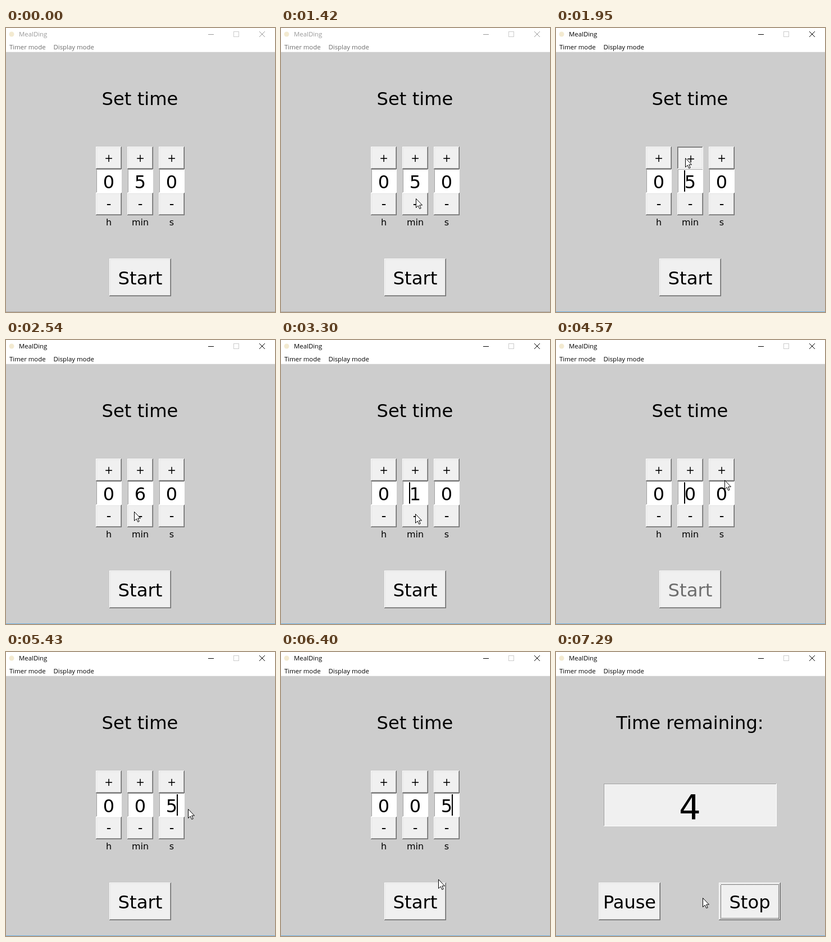
Animation, 479 px wide and 505 px high, one loop 8 s. Source, as an HTML page:

```html
<!DOCTYPE html>
<html lang="en">
<head>
<meta charset="utf-8">
<title>MealDing</title>
<style>
  html, body { margin: 0; width: 100%; height: 100%; overflow: hidden; background: #cdcdcd; }
  svg { display: block; width: 479px; height: 505px; }
  text { font-family: "DejaVu Sans", Verdana, sans-serif; white-space: pre; }
  .ui { font-family: "Open Sans", "Noto Sans", sans-serif; font-size: 11.4px; }
</style>
</head>
<body>
<svg id="stage" viewBox="0 0 479 505" xmlns="http://www.w3.org/2000/svg"></svg>
<script>
const LOOP = 8000;
const stage = document.getElementById("stage");

function add(parent, tag, attrs, content) {
  const node = document.createElementNS("http://www.w3.org/2000/svg", tag);
  for (const key in attrs) node.setAttribute(key, attrs[key]);
  if (content !== undefined) node.textContent = content;
  parent.append(node);
  return node;
}
const rect = (parent, x, y, width, height, fill) =>
  add(parent, "rect", { x, y, width, height, fill });
const label = (parent, x, y, size, content) =>
  add(parent, "text", { x, y, "font-size": size, "text-anchor": "middle" }, content);
const show = (node, visible) => node.setAttribute("display", visible ? "inline" : "none");

// One-pixel bevel: top and left in one colour, bottom and right in the other.
function bevel(parent, x, y, w, h, light, dark) {
  const lines = { fill: "none", "shape-rendering": "crispEdges" };
  add(parent, "path", { ...lines, stroke: light, d: `M${x + .5} ${y + h - 1}V${y + .5}H${x + w - 1}` });
  add(parent, "path", { ...lines, stroke: dark, d: `M${x} ${y + h - .5}H${x + w - .5}V${y}` });
}

function button(parent, x, y, w, h, content, size, baseline) {
  rect(parent, x, y, w, h, "#f0f0f0");
  const raised = add(parent, "g", {});
  bevel(raised, x, y, w, h, "#fff", "#696969");
  bevel(raised, x + 1, y + 1, w - 2, h - 2, "#e3e3e3", "#a0a0a0");
  const sunken = add(parent, "g", { display: "none" });
  bevel(sunken, x, y, w, h, "#696969", "#fff");
  bevel(sunken, x + 1, y + 1, w - 2, h - 2, "#a0a0a0", "#e3e3e3");
  const text = label(parent, x + w / 2, baseline, size, content);
  return {
    text,
    press(down) {
      show(raised, !down);
      show(sunken, down);
      text.setAttribute("transform", down ? "translate(1 1)" : "");
    }
  };
}

function field(parent, x, y, w, h, fill) {
  rect(parent, x, y, w, h, fill);
  bevel(parent, x, y, w, h, "#a0a0a0", "#fff");
}

// Window frame
rect(stage, 0, 0, 479, 505, "#cdcdcd");
rect(stage, 0, 0, 479, 42, "#fff");
rect(stage, 0, 42, 479, 1, "#f0f0f0");
const bottomEdge = rect(stage, 0, 504, 479, 1, "#aaa");
add(stage, "circle", { cx: 10, cy: 11, r: 4.5, fill: "#f3ead0" });
const caption = add(stage, "text", { x: 23, y: 15, class: "ui" }, "MealDing");
const menus = add(stage, "g", { class: "ui" });
add(menus, "text", { x: 6, y: 38, class: "ui" }, "Timer mode");
add(menus, "text", { x: 84.5, y: 38, class: "ui" }, "Display mode");
const controls = add(stage, "g", { fill: "none" });
add(controls, "path", { d: "M360 11.5H370" });
add(controls, "path", { d: "M451 6L461 16M461 6L451 16" });
add(stage, "rect", { x: 405.5, y: 6.5, width: 9, height: 9, fill: "none", stroke: "#ccc" });

// Setup screen
const setup = add(stage, "g", {});
label(setup, 238.5, 136.5, 32.2, "Set time");
const columns = ["h", "min", "s"].map((unit, i) => {
  const x = 160 + 56 * i;
  const plus = button(setup, x, 211, 46, 40, "+", 18.67, 238);
  field(setup, x + 1, 251, 45, 42, "#fff");
  const value = label(setup, x + 23, 285, 32, "0");
  const minus = button(setup, x, 293, 46, 40, "-", 24, 320.5);
  label(setup, x + 23, 351, 16, unit);
  return { plus, minus, value };
});
const [, minutes, seconds] = columns;
const start = button(setup, 184, 410, 110, 67, "Start", 32.4, 456);
const caret = rect(setup, 0, 253, 2, 38, "#000");

// Running screen
const running = add(stage, "g", {});
label(running, 238.5, 136.5, 32.2, "Time remaining:");
field(running, 85, 234, 308, 76, "#f0f0f0");
const remaining = label(running, 238.5, 296.5, 61, "5");
button(running, 76, 410, 110, 67, "Pause", 32, 456);
button(running, 290, 410, 110, 67, "Stop", 32.2, 456);
add(running, "rect", {
  x: 293.5, y: 413.5, width: 103, height: 60, fill: "none", stroke: "#000",
  "stroke-dasharray": "1 1", "shape-rendering": "crispEdges"
});

const pointer = add(stage, "path", {
  d: "M.5 .5V16.5L4.2 13L6.8 18.5L9.2 17.5L6.7 12H11.5Z", fill: "#fff", stroke: "#000"
});

// Pointer track: time, x, y
const track = [
  [810, 367, 495], [1420, 240, 303], [1470, 240, 303], [1610, 230, 254],
  [1810, 230, 231], [2080, 230, 231], [2290, 228, 305], [2590, 228, 305],
  [2720, 239, 309], [3480, 239, 309], [4010, 262, 404], [4060, 262, 404],
  [4090, 262, 407], [4280, 262, 407], [4570, 300, 249], [4620, 300, 249],
  [4760, 302, 252], [4850, 302, 252], [4900, 308, 258], [5050, 308, 258],
  [5820, 340, 300], [6200, 340, 300], [6400, 280, 404], [6450, 280, 404],
  [6590, 261, 437], [LOOP, 261, 437]
];
const minutePresses = [2600, 2740, 2870, 3000, 3140, 3400];
const PRESS = 60;

const within = (t, from, to) => t >= from && t < to;
const inAny = (t, spans) => spans.some(([from, to]) => within(t, from, to));

function pointerAt(t) {
  const i = Math.max(1, track.findIndex(key => key[0] > t));
  const [t0, x0, y0] = track[i - 1], [t1, x1, y1] = track[i];
  const k = (t - t0) / (t1 - t0);
  return [Math.round(x0 + (x1 - x0) * k), Math.round(y0 + (y1 - y0) * k)];
}

function mix(from, to, k) {
  return `rgb(${from.map((c, i) => Math.round(c + (to[i] - c) * k))})`;
}

function render(t) {
  const focus = Math.min(1, Math.max(0, Math.floor((t - 1600) / 50) / 4));
  caption.setAttribute("fill", mix([153, 153, 153], [0, 0, 0], focus));
  menus.setAttribute("fill", mix([109, 109, 109], [0, 0, 0], focus));
  controls.setAttribute("stroke", mix([153, 153, 153], [0, 0, 0], focus));
  bottomEdge.setAttribute("fill", mix([170, 170, 170], [112, 178, 226], focus));

  const started = t >= 7150;
  show(setup, !started);
  show(running, started);
  remaining.textContent = t < 7290 ? 5 : 4;

  const lowered = minutePresses.filter(at => t >= at + PRESS).length;
  minutes.value.textContent = (t < 2050 ? 5 : 6) - lowered;
  minutes.plus.press(within(t, 1950, 2050));
  minutes.minus.press(minutePresses.some(at => within(t, at, at + PRESS)));
  seconds.value.textContent = t < 5050 ? "0" : t < 5160 ? "" : "5";
  start.text.setAttribute("fill", within(t, 3460, 5160) ? "#6d6d6d" : "#000");
  start.press(within(t, 7070, 7150));

  const inMinutes = inAny(t, [[1650, 2190], [2720, 3790], [4320, 4900]]);
  const inSeconds = inAny(t, [[4900, 5690], [6220, 6730]]);
  show(caret, inMinutes || inSeconds);
  caret.setAttribute("x", inMinutes ? 228 : within(t, 5050, 5160) ? 294 : 304);

  show(pointer, t >= 810);
  if (t >= 810) pointer.setAttribute("transform", `translate(${pointerAt(t)})`);
}

const origin = performance.now();
function tick() {
  render((performance.now() - origin) % LOOP);
  requestAnimationFrame(tick);
}
tick();
</script>
</body>
</html>
```
